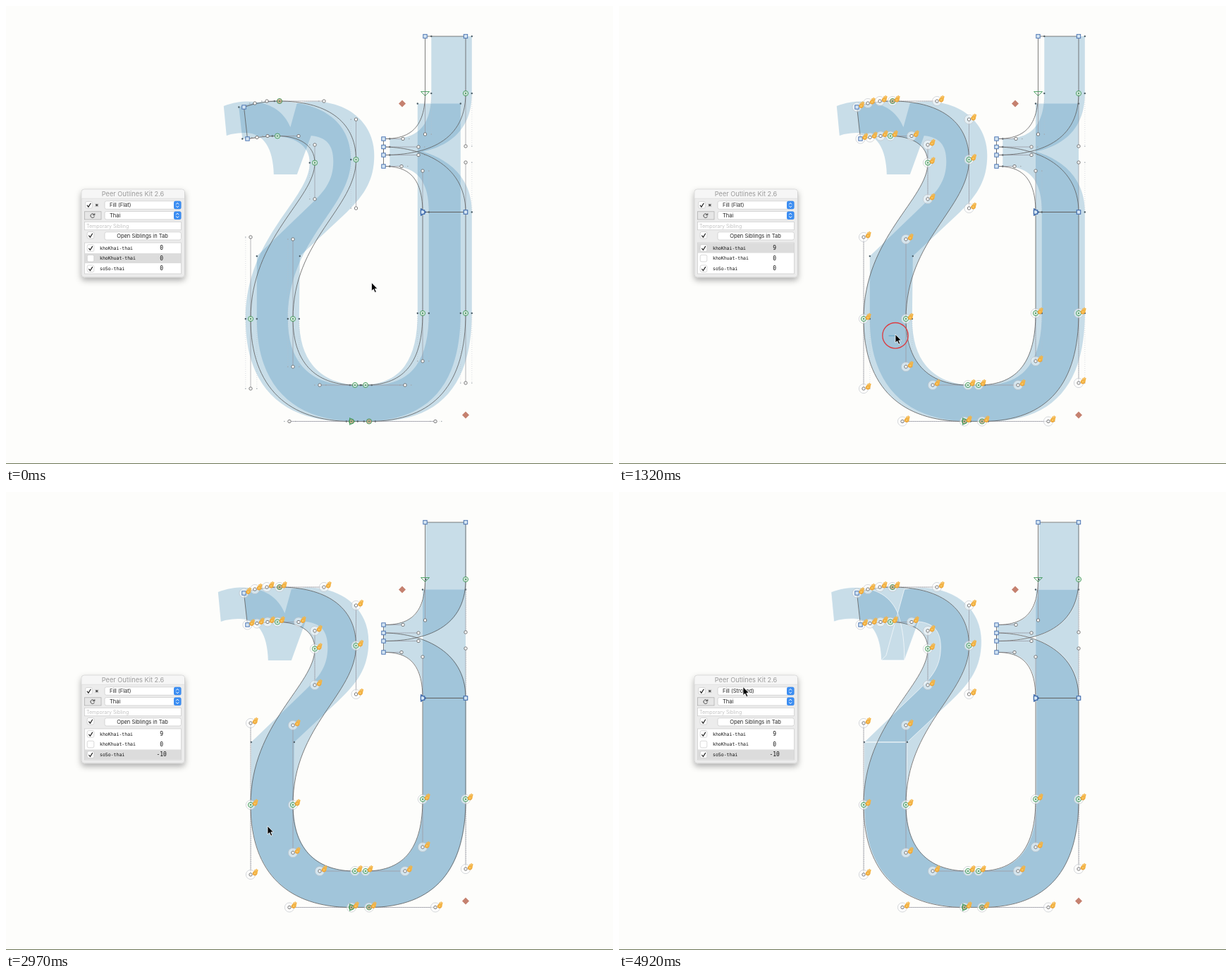
An HTML page for the animation above (4950 ms loop, 861 px wide and 650 px high).

```html
<!DOCTYPE html>
<html lang="en">
<head>
<meta charset="utf-8">
<title>Glyph comparison</title>
<style>
  html, body { margin: 0; width: 100%; height: 100%; overflow: hidden; background: #fdfdfb; }
  svg { display: block; width: 861px; height: 650px; }
  text { font-family: Inter, Roboto, sans-serif; font-size: 7.5px; fill: #222; }
  .mono { font-family: "DejaVu Sans Mono", monospace; font-size: 6.5px; fill: #111; }
  .value { font-size: 8px; text-anchor: middle; }
  .fill { fill: rgba(52, 128, 179, .264); }
  .stroked .fill { stroke: rgba(255, 255, 255, .65); stroke-width: 1; }
  .outline { fill: none; stroke: #5c5c5c; stroke-width: .8; }
  .handle { stroke: #96969f; stroke-width: .7; }
  .ghost .handle { stroke: #b9bcc8; stroke-width: .5; stroke-dasharray: 1 2; }
  .field { fill: #fff; stroke: #c9c9c9; stroke-width: .7; }
</style>
</head>
<body>
<svg id="stage" viewBox="0 0 861 650">
  <defs>
    <filter id="shadow" x="-20%" y="-20%" width="140%" height="150%">
      <feDropShadow dx="0" dy="4" stdDeviation="4.5" flood-color="#000" flood-opacity=".32"/>
    </filter>
    <g id="hand" fill="none" stroke-linecap="round">
      <path d="M-2 3.2 A2.4 2.4 0 1 1 2 3.2 Q0 5.2 -2 3.2" fill="#f8c964" stroke="#eda63a" stroke-width="1.7"/>
      <path d="M-.5 0 L.2 -3 M1.5 .5 L2.2 -4 M2.6 2 L3.8 -3" stroke="#f4b445" stroke-width="1.5"/>
    </g>
  </defs>
  <rect width="861" height="650" fill="#fdfdfb"/>
  <g id="fills"></g>
  <g id="ghosts" class="ghost"></g>
  <g id="handles"></g>
  <g id="outlines"></g>
  <g id="matches"></g>
  <g id="nodes"></g>
  <g id="hands"></g>
  <path d="M562 133.5 l5 5 -5 5 -5 -5z M652 575.5 l5 5 -5 5 -5 -5z" fill="#c5816f"/>
  <rect y="649" width="861" height="1" fill="#6b7554"/>
  <g id="panel"></g>
  <g id="pointer">
    <circle id="press" cy="1.2" r="18.2" fill="none" stroke="#dd3b40" stroke-width="1.3"/>
    <path d="M0 -.5 V11.6 L2.7 9 L4.8 13.6 L6.8 12.7 L4.8 8.3 H8.4 Z" fill="#000" stroke="#fff" stroke-width=".8"/>
  </g>
</svg>
<script>
const UNIT = 0.8, LOOP = 4950, STEP = 30;
const $ = id => document.getElementById(id);

function add(parent, tag, attrs, text) {
  const el = document.createElementNS('http://www.w3.org/2000/svg', tag);
  for (const key in attrs) el.setAttribute(key, attrs[key]);
  if (text !== undefined) el.textContent = text;
  parent.append(el);
  return el;
}

// Letter shapes
const head = 'M337.5 143.5 C353 138 370 135 388 135 C451 135 496.5 161 496.5 218 ';
const neck = 'C496.5 287 407 331 407 444 ';
const bowl = 'C407 512 445 538 495 538 L510 538 C566 538 591 504 591 436 ';
const base = 'L652 436 C652 535 609 589.5 515 589.5 L490 589.5 C402 589.5 347 543 347 444 ';
const back = 'C347 328 438 274 438 222.5 C438 197 415 184.5 385 184.5 C371 184.5 356 186.5 342.5 188.5 Z';
const main = head + neck + bowl + 'L591 292.5 L652 292.5 ' + base + back;
const stem = 'M594.5 43 L652 43 L652 124 C652 199 585 211.5 535.5 211.5 L535.5 188.5 C563 188.5 594.5 182 594.5 124 Z ';
const lower = 'M535.5 200 C585 200 652 222 652 292.5 L591 292.5 C591 234 561 227.5 535.5 227.5 Z';
const column = head + neck + bowl + 'L591 138.5 L652 138.5 ' + base + back;
const forked = stem + lower +
  'M347 355 L408 355 L407 444 ' + bowl + 'L591 292.5 L652 292.5 ' + base + 'Z' +
  'M300 142 C313 137 323 135.5 335 135.5 C364 136 385 148 395 173 C402 194 404 215 404 239 L371 239 C370 202 357 181 332 180 C321 180 312 181 304 184 Z' +
  'M371 239 L378 232 L404 138 Q417 135 430 135.5 C480 137 513.5 168 513.5 212 C513.5 250 497 271 470 297 L408 355 L347 355 L425 280 C446 260 455.5 245 455.5 220 C455.5 198 446 186 424 184 L404 239 Z';

const fillKhai = add($('fills'), 'path', { class: 'fill', d: column });
const fillSo = add($('fills'), 'path', { class: 'fill', d: forked });
for (const d of [main, stem, lower]) add($('outlines'), 'path', { class: 'outline', d });

// Lists on-curve points, off-curve points and handle lines of a path
function readPath(d) {
  const points = [], lines = [];
  let last;
  for (const [, cmd, args] of d.matchAll(/([MLC])([^MLCZ]*)/g)) {
    const n = args.trim().split(/\s+/).map(Number);
    const end = n.slice(-2);
    if (cmd === 'C') {
      const a = n.slice(0, 2), b = n.slice(2, 4);
      points.push({ p: a, off: true }, { p: b, off: true });
      lines.push([last, a], [b, end]);
    }
    points.push({ p: end });
    last = end;
  }
  return { points, lines };
}

const isCorner = ([x, y]) => y < 50 || y === 292.5 || x === 535.5 || x < 345;
const triangle = ([x, y]) => x === 594.5 && y === 124 ? 'M-6 -2.5 H6 L0 3.5 Z'
  : x === 591 && y === 292.5 || x === 490 ? 'M-2.5 -5 L5 0 L-2.5 5 Z' : '';

function drawNode({ p, off }) {
  const g = add($('nodes'), 'g', { transform: `translate(${p})` });
  const tri = triangle(p), corner = isCorner(p);
  if (off) return add(g, 'circle', { r: 2.2, fill: '#fff', stroke: '#5b5b5b', 'stroke-width': .8 });
  const color = corner ? '#3c69ac' : '#3f9958';
  if (corner) add(g, 'rect', { x: -2.7, y: -2.7, width: 5.4, height: 5.4, fill: '#d4e5f3', stroke: color, 'stroke-width': .9 });
  else if (p[0] !== 594.5) {
    const warm = p[0] === 388 || p[1] === 589.5;
    add(g, 'circle', { r: 3.6, fill: warm ? '#c99e7c' : '#d9ebdd', 'fill-opacity': .75, stroke: color, 'stroke-width': .9 });
    add(g, 'circle', { r: 1.1, fill: color });
  }
  if (tri) add(g, 'path', { d: tri, fill: 'none', stroke: color, 'stroke-width': .9 });
}

function drawMatches(points) {
  const halos = add($('matches'), 'g', {}), hands = add($('hands'), 'g', {});
  for (const { p: [x, y] } of points) {
    add(halos, 'circle', { cx: x, cy: y, r: 6.6, fill: '#fff', 'fill-opacity': .55, stroke: '#b9bec4', 'stroke-width': .6 });
    add(hands, 'use', { href: '#hand', x: x + 6, y: y - 3.5 });
  }
  return show => { halos.style.display = hands.style.display = show ? '' : 'none'; };
}

function drawGhost(points, lines) {
  const g = add($('ghosts'), 'g', {});
  drawHandles(g, lines);
  for (const { p: [x, y], off } of points)
    add(g, 'circle', { cx: x, cy: y, r: off ? .8 : 1.2, fill: off ? '#a0a8ae' : '#4d5f68' });
  return g;
}

function drawHandles(parent, lines) {
  for (const [a, b] of lines) add(parent, 'line', { class: 'handle', x1: a[0], y1: a[1], x2: b[0], y2: b[1] });
}

const letter = readPath(main), arm = readPath(stem + lower);
const bowlPoints = letter.points.filter(({ p }) => p[1] >= 436);
const bowlLines = letter.lines.filter(([a, b]) => a[1] >= 436 && b[1] >= 436);
const on = (...ps) => ps.map(p => ({ p }));
const ghostKhai = drawGhost([...letter.points.filter(({ p }) => p[1] !== 292.5), ...on([591, 138.5], [652, 138.5])], letter.lines);
const ghostSo = drawGhost([...arm.points, ...bowlPoints, ...on([347, 355], [408, 355])], [...arm.lines, ...bowlLines]);
drawHandles($('handles'), [...letter.lines, ...arm.lines]);
[...letter.points, ...arm.points].forEach(drawNode);
const showKhai = drawMatches(letter.points.filter(({ p }) => p[1] !== 292.5));
const showSo = drawMatches(arm.points);

// Floating panel
const panel = $('panel');
const rect = (x, y, width, height, more) => add(panel, 'rect', { x, y, width, height, ...more });
const label = (x, y, s, more) => add(panel, 'text', { x, y, ...more }, s);

function checkbox(x, y, checked) {
  rect(x - 4.8, y - 4.8, 9.6, 9.6, { class: 'field', rx: 2 });
  if (checked) add(panel, 'path', { d: `M${x - 2.6} ${y + .3} l2 2.5 l3.4 -5.4`, fill: 'none', stroke: '#222', 'stroke-width': 1.2 });
}

function popup(y, s) {
  rect(140, y, 108.5, 11.5, { class: 'field', rx: 2.5 });
  rect(238, y, 10.5, 11.5, { rx: 2.5, fill: '#3b8df2' });
  add(panel, 'path', { d: `M241.2 ${y + 4.8} l2 -2.2 2 2.2 M241.2 ${y + 6.8} l2 2.2 2 -2.2`, fill: 'none', stroke: '#fff', 'stroke-width': 1 });
  return label(147, y + 8.6, s);
}

rect(107, 260, 146.5, 125, { rx: 4, fill: '#ececec', stroke: '#c4c4c4', 'stroke-width': .6, filter: 'url(#shadow)' });
add(panel, 'path', { d: 'M107.5 273 V264 Q107.5 260.5 111 260.5 H249.5 Q253 260.5 253 264 V273 Z', fill: '#f6f6f6' });
rect(107.3, 272.8, 146, .6, { fill: '#d8d8d8' });
label(180, 270, 'Peer Outlines Kit 2.6', { 'text-anchor': 'middle', style: 'font-size:9.2px;fill:#9b9b9b' });
checkbox(117.5, 282.3, true);
add(panel, 'path', { d: 'M127 280.8 l3.6 3.6 m0 -3.6 l-3.6 3.6 m0 -1.8 h3.6 m-1.8 -1.8 v3.6', stroke: '#444', 'stroke-width': .9 });
const styleLabel = popup(276.8, '');
rect(111.5, 291.8, 23.5, 11.2, { fill: '#e6e6e6', stroke: '#a9a9a9', 'stroke-width': .7 });
add(panel, 'path', { d: 'M125.4 298.6 A2.8 2.8 0 1 1 125 296 M125.8 294.3 V296.8 H123.2', fill: 'none', stroke: '#333', 'stroke-width': .9 });
popup(291.5, 'Thai');
rect(111.5, 306.3, 137, 11.5, { class: 'field' });
label(114, 314.6, 'Temporary Sibling', { style: 'font-size:7px;fill:#c2c2c2' });
checkbox(120, 325.3, true);
rect(140, 320.8, 108.5, 11.2, { class: 'field', rx: 2.5 });
label(193.5, 329.2, 'Open Siblings in Tab', { 'text-anchor': 'middle' });
rect(111.5, 336, 137, 44, { class: 'field' });
const selection = rect(111.8, 336.3, 136.4, 14.2, { fill: '#dcdcdc' });
const values = ['khoKhai-thai', 'khoKhuat-thai', 'soSo-thai'].map((name, i) => {
  const y = 343.5 + i * 14.6;
  checkbox(120, y, i !== 1);
  label(133, y + 2, name, { class: 'mono' });
  return label(220.7, y + 2.5, '0', { class: 'mono value' });
});
const trail = add($('hands'), 'line', { x1: 382.5, y1: 468, y2: 468, stroke: '#68a9c8', 'stroke-width': 1.2 });

// Timeline: rows of [time, ...values]
const pointerKeys = [[0, 518.5, 393], [60, 518.5, 393], [520, 382.5, 468], [780, 382.5, 468], [1260, 392, 466.5],
  [1500, 392, 466.5], [1800, 384, 480.5], [1950, 384, 480.5], [2080, 380.5, 475], [2420, 371.5, 473.5],
  [2850, 371, 474.5], [3640, 371, 474.5], [4150, 180, 281], [4350, 176, 277]];
const khaiKeys = [[780, 0], [1260, 9]];
const soKeys = [[2080, 0], [2400, -11], [2760, -11], [2820, -10]];

function sample(keys, t) {
  const next = keys.findIndex(k => k[0] > t);
  if (next < 0) return keys.at(-1).slice(1);
  if (next === 0) return keys[0].slice(1);
  const a = keys[next - 1], b = keys[next];
  const u = (t - a[0]) / (b[0] - a[0]), e = u * u * (3 - 2 * u);
  return a.slice(1).map((v, i) => v + (b[i + 1] - v) * e);
}

const within = (t, from, to) => t >= from && t < to;
const shift = (el, x) => el.setAttribute('transform', `translate(${x} 0)`);

function render(t) {
  const khai = Math.round(sample(khaiKeys, t)[0]), so = Math.round(sample(soKeys, t)[0]);
  const [x, y] = sample(pointerKeys, t);
  for (const el of [fillKhai, ghostKhai]) shift(el, (khai - 9) * UNIT);
  for (const el of [fillSo, ghostSo]) shift(el, (so + 11) * UNIT);
  showKhai(khai === 9);
  showSo(so === -11);
  values[0].textContent = khai;
  values[2].textContent = so;
  const row = t < 480 ? 1 : t < 1740 ? 0 : 2;
  selection.setAttribute('y', 336.3 + row * 14.6);
  const stroked = t >= 4230;
  $('fills').setAttribute('class', stroked ? 'stroked' : '');
  styleLabel.textContent = stroked ? 'Fill (Stroked)' : 'Fill (Flat)';
  $('pointer').setAttribute('transform', `translate(${x} ${y})`);
  $('press').style.display = within(t, 570, 1440) || within(t, 2010, 2940) ? '' : 'none';
  trail.setAttribute('x2', x);
  trail.style.display = within(t, 780, 1440) ? '' : 'none';
}

const start = performance.now();
function tick() {
  const t = (performance.now() - start) % LOOP;
  render(Math.floor(t / STEP) * STEP);
  requestAnimationFrame(tick);
}
tick();
</script>
</body>
</html>
```
